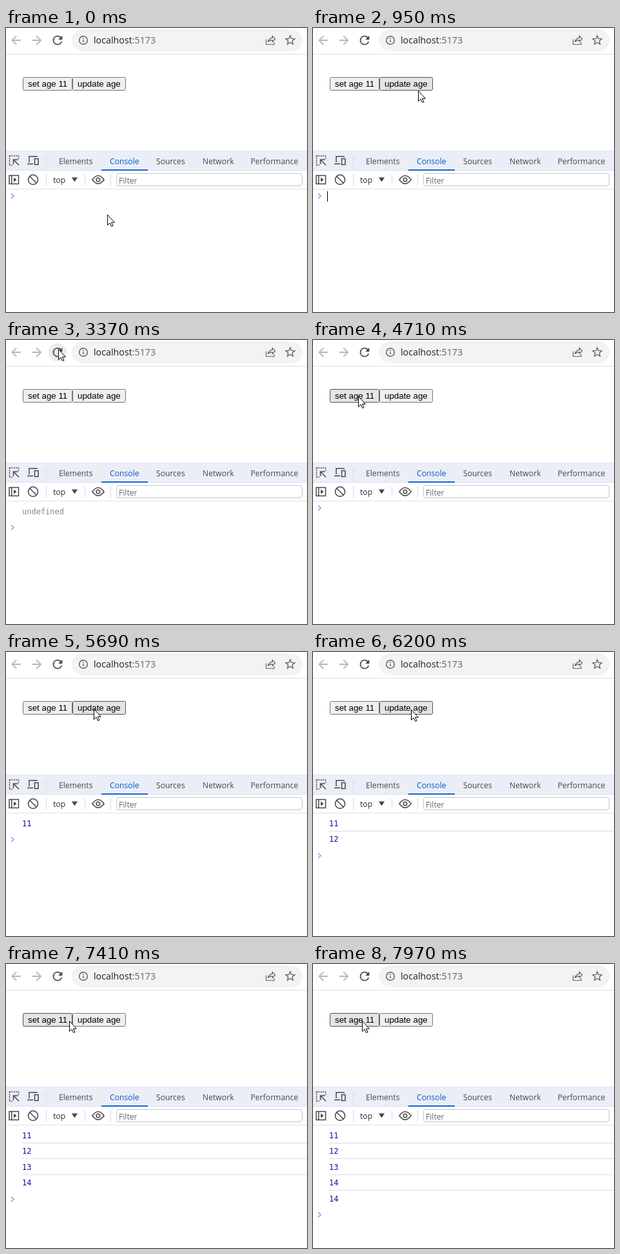
An HTML page for the animation above (8000 ms loop, 467 px wide and 440 px high).

```html
<!DOCTYPE html>
<html lang="en">
<head>
<meta charset="utf-8">
<title>Age buttons</title>
<style>
  html, body { margin: 0; width: 100%; height: 100%; overflow: hidden; background: #fff; }
  svg { display: block; width: 467px; height: 440px; }
  .ui { font: 12.2px "Open Sans", "Noto Sans", sans-serif; fill: #474747; }
  .url { font: 14.25px "Open Sans", "Noto Sans", sans-serif; fill: #202124; }
  .btn text { font: 13.333px "Liberation Sans", Arial, sans-serif; fill: #000; }
  .log { font: 12px "DejaVu Sans Mono", monospace; fill: #1a0a9c; }
  .line { fill: none; stroke: #474747; stroke-width: 1.5; }
  .btn rect { fill: #efefef; stroke: #767676; }
  .btn.hover rect { fill: #e5e5e5; stroke: #4f4f4f; }
  .btn.press rect { fill: #f5f5f5; stroke: #8d8d8d; }
</style>
</head>
<body>
<svg viewBox="0 0 467 440">
  <!-- browser bar -->
  <circle id="halo" cx="80" cy="19" r="14" fill="#ebebec"/>
  <defs><path id="arrow" d="M20 11H7.8l5.6-5.6L12 4l-8 8 8 8 1.4-1.4L7.8 13H20z"/></defs>
  <use href="#arrow" transform="translate(4.5 8) scale(.92)" fill="#b4b6b8"/>
  <use href="#arrow" transform="translate(59 8) scale(-.92 .92)" fill="#b4b6b8"/>
  <path transform="translate(69 8) scale(.92)" fill="#47494c"
    d="M17.65 6.35A8 8 0 1 0 19.73 14h-2.08A6 6 0 1 1 12 6c1.66 0 3.14.69 4.22 1.78L13 11h7V4z"/>
  <rect x="102" y="2" width="358" height="34" rx="17" fill="#f1f3f4"/>
  <g class="line" style="stroke:#5f6368">
    <circle cx="120" cy="19" r="6.3"/>
    <path d="M120 18.3v4M120 15.3v1.6"/>
    <path stroke-width="1.2" d="M403.6 17.5v8h12.5v-3.5M406.5 21.5c1-4.5 3.5-6 6.8-6.3v-2.9l4.3 4.7-4.3 4.5v-2.9c-3 0-5 .8-6.8 2.9z"/>
    <path transform="translate(432.6 10.4) scale(.7)" stroke-width="2"
      d="M22 9.24l-7.19-.62L12 2 9.19 8.63 2 9.24l5.46 4.73L5.82 21 12 17.27 18.18 21l-1.63-7.03z"/>
  </g>
  <text class="url" x="136" y="24">localhost<tspan fill="#5f6368">:5173</tspan></text>
  <rect y="40" width="467" height="1" fill="#dfe1e4"/>

  <!-- page -->
  <g class="btn"><rect x="26.5" y="76.5" width="76" height="20" rx="2"/><text x="34" y="91">set age 11</text></g>
  <g class="btn"><rect x="103.5" y="76.5" width="82" height="20" rx="2"/><text x="111" y="91">update age</text></g>

  <!-- developer tools -->
  <rect y="190" width="467" height="31" fill="#d3e3fd"/>
  <rect y="191" width="467" height="29" fill="#ebeef6"/>
  <rect x="148" y="219" width="72" height="2" fill="#1267d6"/>
  <rect y="249" width="467" height="1" fill="#dde3ee"/>
  <path d="M62.5 198v16M62.5 226v18M122.5 226v18M162.5 226v18" stroke="#cbdcf8"/>
  <g class="ui">
    <text x="82" y="211">Elements</text>
    <text x="161" y="211" fill="#0b57d0">Console</text>
    <text x="233" y="211">Sources</text>
    <text x="305" y="211">Network</text>
    <text x="379.5" y="211">Performance</text>
    <text x="73" y="240" fill="#303030">top</text>
  </g>
  <path d="M102 231.5h9l-4.5 7z" fill="#474747"/>
  <g class="line">
    <path d="M19.5 203v-5M5 198h15M5 212.500h5M5.500 198v15" stroke-dasharray="2 1.5"/>
    <path d="M11.500 211v-7h7M11.500 204l8.500 8.500"/>
    <path d="M36 208v-9h13M33 210.500h9M44.500 202.500h5.500v9h-5.500z"/>
    <path d="M5 228.500h14.500v13H5zM8.800 228.500v13"/>
    <path d="M12 231.500l4.500 3.500-4.500 3.500z" fill="#474747" stroke="none"/>
    <circle cx="42" cy="235" r="7.500"/>
    <path d="M36.700 229.700l10.600 10.600"/>
    <path d="M134 235q9-12.500 18 0q-9 12.500-18 0z"/>
    <circle cx="143" cy="235" r="2.800"/>
  </g>
  <rect x="171.5" y="225.500" width="288" height="19" rx="3.500" fill="#fff" stroke="#c3c5c9"/>
  <text class="ui" x="175" y="241" style="fill:#64676b">Filter</text>

  <!-- console -->
  <g id="rows"></g>
  <path id="prompt" d="M8 -3.8L12 0L8 3.8" fill="none" stroke="#6ea2f4" stroke-width="1.5"/>
  <rect id="caret" x="22" y="253" width="1" height="16" fill="#000"/>

  <path id="cursor" d="M.5 .5v16l3.600-3.400 2.600 5.400 2.300-1-2.500-5.300h4.900z" fill="#fff" stroke="#000"/>
</svg>
<script>
const LOOP = 8000;
const SET = 1, UPDATE = 2;

// [start, x, y, hovered button]
const moves = [
  [0, 157, 289, 0], [530, 138, 236, 0], [680, 151, 170, 0], [800, 158, 117, 0],
  [950, 163, 97, UPDATE], [1070, 166, 88, UPDATE], [1220, 167, 86, UPDATE],
  [1370, 167, 85, UPDATE], [2920, 142, 80, UPDATE], [3070, 104, 36, 0],
  [3220, 85, 15, 0], [3370, 81, 14, 0], [4320, 82, 52, 0], [4440, 72, 86, SET],
  [4560, 70, 92, SET], [4710, 70, 87, SET], [5540, 106, 86, SET],
  [5690, 136, 88, UPDATE], [5810, 149, 89, UPDATE], [5930, 152, 89, UPDATE],
  [7290, 136, 89, UPDATE], [7410, 98, 88, SET], [7530, 76, 88, SET],
];

// [press, release, logged value]; the page reloads between the first two
const RELOAD = 3650;
const clicks = [
  [1370, 1520, "undefined"], [4860, 4980, 11], [6080, 6200, 12],
  [6470, 6620, 13], [6890, 7010, 14], [7840, 7970, 14],
];

const $ = id => document.getElementById(id);
const buttons = document.querySelectorAll(".btn");
const within = (t, from, to) => t >= from && t < to;
const show = (id, on) => $(id).setAttribute("visibility", on ? "visible" : "hidden");
const place = (id, x, y) => $(id).setAttribute("transform", `translate(${x} ${y})`);
let shownRows = null;

function row(value, i) {
  const fill = value === "undefined" ? ' style="fill:#80868b"' : "";
  const rule = i ? `<rect x="25" y="${Math.floor(252.700 + 24.500 * i)}" width="442" height="1" fill="${i === 3 ? "#d3e3fd" : "#dcdddf"}"/>` : "";
  return `${rule}<text class="log" x="25" y="${Math.round(269.700 + 24.500 * i)}"${fill}>${value}</text>`;
}

function draw(t) {
  const [, x, y, hovered] = moves.findLast(move => move[0] <= t);
  place("cursor", x, y);

  const pressed = clicks.some(([down, up]) => within(t, down, up));
  buttons.forEach((button, i) => {
    const state = hovered !== i + 1 ? "" : pressed ? " press" : " hover";
    button.setAttribute("class", "btn" + state);
  });

  const values = clicks
    .filter(([, up]) => up <= t && (t < RELOAD || up > RELOAD))
    .map(click => click[2]);
  const html = values.map(row).join("");
  if (html !== shownRows) $("rows").innerHTML = shownRows = html;
  place("prompt", 0, values.length ? Math.floor(266 + 24.500 * values.length) + .5 : 260.500);

  show("caret", within(t, 680, 1220));
  show("halo", within(t, 3370, 4320));
}

function frame(now) {
  draw(now % LOOP);
  requestAnimationFrame(frame);
}
draw(0);
requestAnimationFrame(frame);
</script>
</body>
</html>
```
